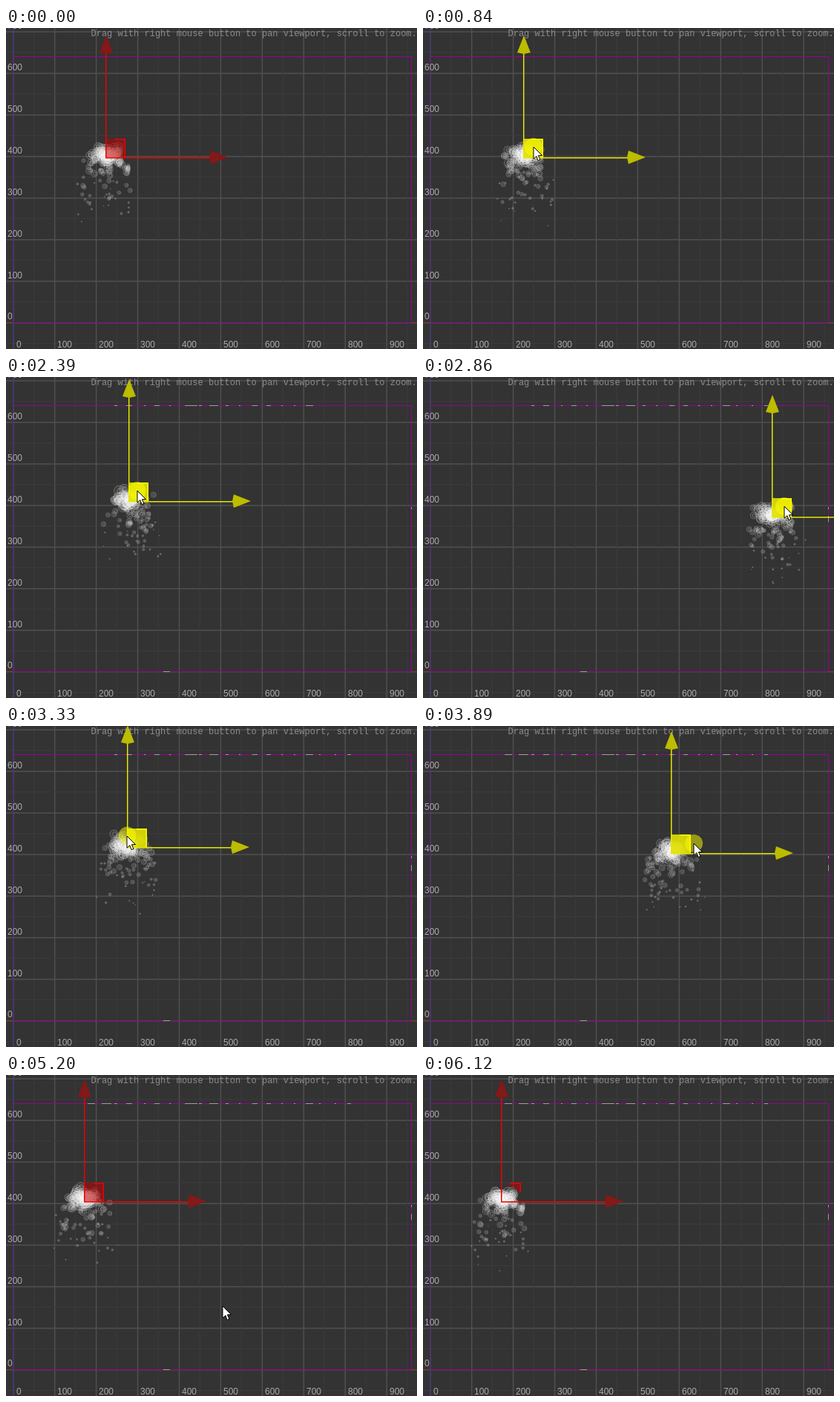
An HTML page with a canvas that plays this animation: 554x432 px, repeating every 6.2 s.

```html
<!DOCTYPE html>
<html lang="en">
<head>
<meta charset="utf-8">
<title>Particle editor</title>
<style>
html, body { margin: 0; width: 100%; height: 100%; overflow: hidden; background: #333; }
canvas { display: block; }
</style>
</head>
<body>
<canvas id="stage" width="554" height="432"></canvas>
<script>
const ctx = document.getElementById('stage').getContext('2d');
const W = 554, H = 432, TAU = Math.PI * 2;
const STEPS = 80, STEP_MS = 77.5;
const CELL = 55.94, LEFT = 9, BOTTOM = 396, RIGHT = 546, TOP = 38;
const PARTICLES = 140, LIFE = 16;

// The gizmo rests at home, then swings to each point between two steps.
const HOME = { x: 135, y: 174 };
const SWINGS = [
  { from: 9.5, to: 16.8, x: 140, y: 174 },
  { from: 16.8, to: 23.8, x: 420, y: 188 },
  { from: 24.8, to: 31.4, x: 163, y: 167 },
  { from: 31.4, to: 37.4, x: 475, y: 188 },
  { from: 38.5, to: 44.5, x: 106, y: 158 },
  { from: 46.4, to: 52.4, x: 460, y: 178 },
  { from: 53.1, to: 60.5, x: 106, y: 170 },
];

function gizmoAt(step) {
  let { x, y } = HOME;
  for (const swing of SWINGS) {
    const u = Math.min(1, Math.max(0, (step - swing.from) / (swing.to - swing.from)));
    const s = u * u * (3 - 2 * u);
    x += (swing.x - x) * s;
    y += (swing.y - y) * s;
  }
  return { x, y };
}

function cursorAt(step) {
  if (step < 4 || step >= 69) return null;
  if (step < 9) {
    const rest = ((9 - step) / 6) ** 1.6;
    return { x: 147 + 133 * rest, y: 160 + 280 * rest };
  }
  // While dragging, the pointer runs slightly ahead of the gizmo.
  const ahead = gizmoAt(step + 0.2);
  const leave = Math.max(0, (step - 62) / 6);
  return { x: ahead.x + 13 + 321 * leave ** 3.38, y: ahead.y - 14 + 252 * leave ** 2.68 };
}

function random(n) {
  const s = Math.sin(n * 127.1 + 11.7) * 43758.5453;
  return s - Math.floor(s);
}

function rect(color, x, y, w, h) {
  ctx.fillStyle = color;
  ctx.fillRect(x, y, w, h);
}

function polygon(color, points) {
  ctx.fillStyle = color;
  ctx.beginPath();
  points.forEach(([x, y]) => ctx.lineTo(x, y));
  ctx.closePath();
  ctx.fill();
}

function circle(x, y, radius) {
  ctx.beginPath();
  ctx.arc(x, y, radius, 0, TAU);
}

function drawGrid() {
  rect('#333', 0, 0, W, H);
  for (let i = -1; i < 20; i++) {
    const major = i % 2 === 0;
    const color = major ? '#505050' : '#3c3c3c', size = major ? 1.5 : 1;
    rect(color, LEFT + i * CELL / 2, 0, size, H);
    rect(color, 0, BOTTOM - i * CELL / 2, W, size);
  }
  rect('#8a3a22', 0, BOTTOM, W, 1);
  rect('#38389c', LEFT, 0, 1, H);
  ctx.lineWidth = 1;
  ctx.strokeStyle = '#990099';
  ctx.strokeRect(LEFT + 0.5, TOP + 0.5, RIGHT - LEFT, BOTTOM - TOP);
  rect('rgba(56,56,156,.6)', LEFT, 0, 1, H);
}

function drawLabels() {
  ctx.fillStyle = '#aaa';
  ctx.font = '12px "Liberation Sans", Arial, sans-serif';
  for (let i = 0; i < 10; i++) {
    ctx.fillText(i * 100, 14 + Math.floor(i * CELL), 430);
    ctx.fillText(i * 100, 2, 392 - Math.floor(i * CELL));
  }
  ctx.fillStyle = '#8c8c8c';
  ctx.font = '12px "Liberation Mono", "Courier New", monospace';
  ctx.fillText('Drag with right mouse button to pan viewport, scroll to zoom.', 114.5, 11);
}

// Pale dashes stay on the frame wherever the gizmo has crossed it.
function drawSpecks(step) {
  const visited = [];
  for (let s = 17; s <= step; s++) visited.push(gizmoAt(s).x);
  const min = Math.min(...visited), max = Math.max(...visited);
  for (let i = 0; i < 20; i++) {
    const x = Math.round(106 + i * 18.5 + random(i) * 6);
    const length = 2 + Math.round(random(i + 50) ** 2 * 16);
    if (x >= min && x + length <= max) rect('#a59aa5', x, TOP, length, 1);
  }
  if (max > 382) rect('#a59aa5', RIGHT, 175, 1, 3);
  if (max > 440) rect('#a59aa5', RIGHT, 187, 1, 8);
  if (max > 220) rect('#a59aa5', 212, BOTTOM, 9, 1);
}

function drawParticles(step, origin) {
  ctx.lineWidth = 0.8;
  for (let i = 0; i < PARTICLES; i++) {
    const clock = step / LIFE + i / PARTICLES;
    const age = clock % 1;
    const seed = i * 5 + (Math.floor(clock) % 5) * 997;
    const angle = random(seed) * TAU, offset = random(seed + 1) * 9;
    const drift = (random(seed + 2) * 2 - 1) * 42 * age ** 0.7;
    const x = origin.x + Math.cos(angle) * offset + drift;
    const y = origin.y + Math.sin(angle) * offset
      - (15 + 65 * random(seed + 3)) * age + 115 * age * age;
    const radius = 7.5 * (1 - age) ** 0.9 + 0.3;
    const light = 0.2 + 0.18 * (1 - age);
    ctx.strokeStyle = `rgba(255,255,255,${light})`;
    ctx.fillStyle = 'rgba(255,255,255,.05)';
    circle(x, y, radius);
    ctx.fill();
    ctx.stroke();
    circle(x + radius * 0.15, y, radius * 0.5);
    ctx.stroke();
  }
}

function drawGizmo({ x, y }, active, worn) {
  const line = active ? '#e6e600' : '#f00000';
  const head = active ? '#bcbc00' : '#851818';
  const fill = active ? 'rgba(225,225,0,.9)' : 'rgba(190,0,0,.55)';
  const edge = active ? '#ffff00' : '#f00000';
  if (worn) polygon(fill, [[x + 8, y - 23], [x + 13, y - 25], [x + 25, y - 25], [x + 25, y - 12]]);
  else rect(fill, x, y - 25, 25, 25);
  rect(edge, x + 12, y - 25, 14, 1.5);
  rect(edge, x + 24.5, y - 25, 1.5, worn ? 13 : 25);
  rect(line, x - 1, y - 140, 1.5, 141);
  rect(line, x - 1, y, 141, 1.5);
  polygon(head, [[x, y - 164], [x - 9, y - 141], [x, y - 139], [x + 9, y - 141]]);
  polygon(head, [[x + 164, y], [x + 141, y - 9], [x + 139, y], [x + 141, y + 9]]);
}

function drawCursor(x, y) {
  const shape = [[0, 0], [0, 16], [4, 12.6], [6, 18.5], [9, 17.4], [6.4, 11.7], [11.5, 11.5]];
  polygon('#fff', shape.map(([dx, dy]) => [x + dx, y + dy]));
  ctx.strokeStyle = '#000';
  ctx.lineWidth = 1;
  ctx.stroke();
}

function draw(step) {
  const { x, y } = gizmoAt(step);
  const gizmo = { x: Math.round(x), y: Math.round(y) };
  const active = step >= 10 && step < 65;
  const cursor = cursorAt(step);
  drawGrid();
  drawLabels();
  drawSpecks(step);
  drawParticles(step, gizmo);
  drawGizmo(gizmo, active, step >= 70);
  if (!cursor) return;
  if (active) {
    ctx.fillStyle = 'rgba(255,255,0,.5)';
    circle(cursor.x, cursor.y, 12);
    ctx.fill();
  }
  drawCursor(Math.round(cursor.x), Math.round(cursor.y));
}

const start = performance.now();
function tick() {
  const time = performance.now() - start;
  draw(Math.floor((time + 13) / STEP_MS) % STEPS);
  requestAnimationFrame(tick);
}
tick();
</script>
</body>
</html>
```
